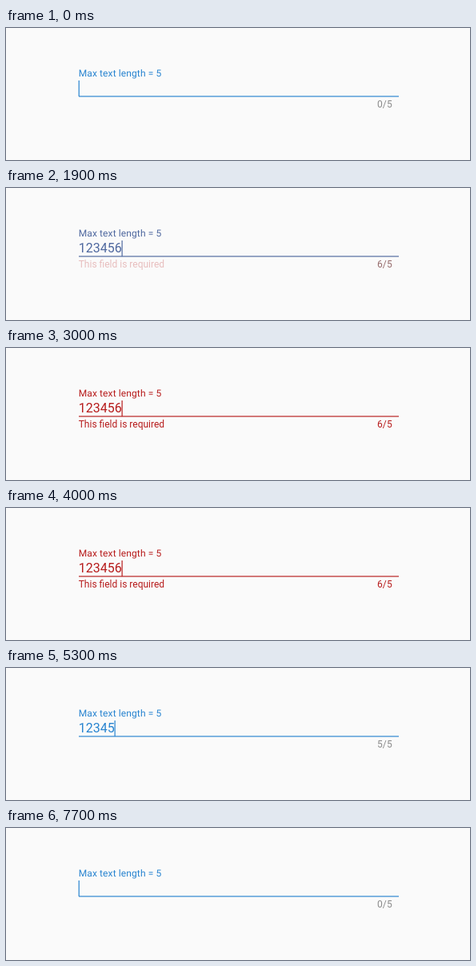
Recreate the animation shown at these times as an HTML page. Size 580x166 px, loop 8 s.

```html
<!DOCTYPE html>
<html lang="en">
<head>
<meta charset="utf-8">
<title>Text field with length limit</title>
<style>
  html, body { margin: 0; width: 100%; height: 100%; overflow: hidden; background: #fafafa; }
  svg { display: block; font: 12px Roboto, sans-serif; }
  #value { font-size: 16px; }
  #label { letter-spacing: .11px; text-rendering: geometricPrecision; }
  #counter { letter-spacing: .15px; }
</style>
</head>
<body>
<svg width="580" height="166" viewBox="0 0 580 166">
  <g id="field">
    <text id="label" x="90.7" y="60.5">Max text length = 5</text>
    <text id="value" x="90.7" y="81"></text>
    <rect id="caret" y="66" width="1.2" height="20"/>
    <rect x="91" y="85" width="400" height="2" opacity=".58"/>
  </g>
  <text id="message" x="90.7" y="100" fill="#b71c1c">This field is required</text>
  <text id="counter" x="463.9" y="100"></text>
</svg>
<script>
const LOOP = 8000, STEP = 100, BLINK = 510, FADE = 300;
const BLUE = 'rgb(40 132 208)', RED = '#b71c1c', GREY = 'rgb(138 138 138)';
const DIGIT_WIDTH = 8.985;

// A run of evenly spaced key presses; one digit is erased before the long pause.
const typing = { start: 20, every: 375, presses: 6 };
const firstErase = { start: 4280, every: 1, presses: 1 };
const erasing = { start: 5330, every: 336, presses: 5 };

const el = id => document.getElementById(id);
const [field, value, caret, message, counter] =
  ['field', 'value', 'caret', 'message', 'counter'].map(el);

const clamp = (x, low, high) => Math.min(high, Math.max(low, x));
const pressed = (run, t) => clamp(1 + Math.floor((t - run.start) / run.every), 0, run.presses);
const lastPress = (run, t) => {
  const n = pressed(run, t);
  return n ? run.start + (n - 1) * run.every : 0;
};
const easeOut = (t, start) => 1 - (1 - clamp((t - start) / FADE, 0, 1)) ** 3;
const mix = (from, to, k) => `color-mix(in srgb, ${to} ${k * 100}%, ${from})`;

function draw(t) {
  const count = pressed(typing, t) - pressed(firstErase, t) - pressed(erasing, t);
  const idle = t - Math.max(...[typing, firstErase, erasing].map(run => lastPress(run, t)));
  const error = easeOut(t, 1870) - easeOut(t, 4215);

  field.style.fill = mix(BLUE, RED, error);
  value.textContent = '123456'.slice(0, count);
  caret.setAttribute('x', 90.6 + count * DIGIT_WIDTH);
  caret.setAttribute('opacity', Math.floor(idle / BLINK) % 2 ? 0 : 1);
  message.setAttribute('opacity', error);
  counter.textContent = `${count}/5`;
  counter.style.fill = mix(GREY, RED, error);
}

function tick() {
  const t = performance.now() % LOOP;
  draw(Math.floor(t / STEP) * STEP);
  requestAnimationFrame(tick);
}
tick();
</script>
</body>
</html>
```
